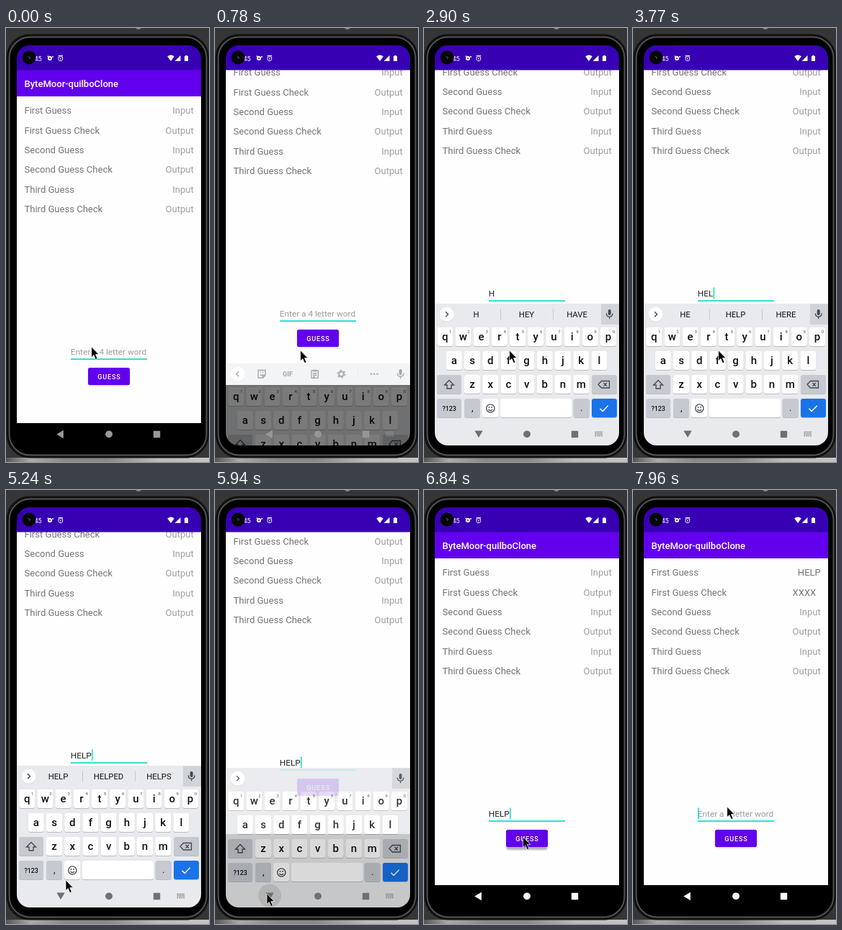
An HTML page that plays this animation: 282 px wide and 603 px high, repeating every 8000 ms.

```html
<!DOCTYPE html>
<html lang="en">
<head>
<meta charset="utf-8">
<style>
html, body { margin: 0; width: 100%; height: 100%; overflow: hidden; background: #363638; }
svg { display: block; width: 100vw; height: 100vh; }
text { font-family: Roboto, sans-serif; white-space: pre; }
.row { font-size: 13.04px; }
.field { font-size: 11.8px; }
</style>
</head>
<body>
<svg id="stage" viewBox="0 0 282 603">
  <defs>
    <clipPath id="screen"><rect x="15" y="24" width="256" height="556" rx="18"/></clipPath>
    <clipPath id="window"><rect x="15" y="58" width="256" height="522"/></clipPath>
    <linearGradient id="desk">
      <stop offset="0" stop-color="#555"/><stop offset=".12" stop-color="#aaa"/>
      <stop offset=".3" stop-color="#888"/><stop offset=".5" stop-color="#888"/>
      <stop offset=".75" stop-color="#bbb"/><stop offset="1" stop-color="#c4c4c4"/>
    </linearGradient>
    <filter id="blur" x="-20%" y="-40%" width="140%" height="180%"><feGaussianBlur stdDeviation="1.3"/></filter>
  </defs>

  <rect width="282" height="603" fill="#363638"/>
  <circle cx="184" cy="-3" r="5" fill="#888"/>
  <rect y="597" width="282" height="6" fill="url(#desk)"/>
  <rect x="2" y="10" width="278.5" height="586" rx="31" fill="#050505" stroke="#111" stroke-width="3"/>
  <rect x="4.5" y="12.5" width="274" height="581" rx="29" fill="none" stroke="#555557" stroke-width="1.8"/>
  <rect x="7.5" y="15.5" width="268" height="575" rx="26" fill="#000"/>

  <g clip-path="url(#screen)">
    <rect x="15" y="24" width="256" height="556"/>
    <g clip-path="url(#window)">
      <g id="app">
        <rect x="15" y="58" width="256" height="491" fill="#fefefe"/>
        <rect x="15" y="58" width="256" height="37" fill="#6200ee"/>
        <text x="25.5" y="82" font-size="13.04" font-weight="500" fill="#fff">ByteMoor-quilboClone</text>
        <g id="rows"></g>
        <text id="typed" class="field" x="89.8" y="454"></text>
        <rect x="90" y="459.3" width="106" height="1.6" fill="#03dac5"/>
        <rect id="caret" y="441.5" width="1.4" height="15.5" fill="#03dac5"/>
        <rect id="shade" x="114.5" width="57" height="23" rx="3" filter="url(#blur)"/>
        <rect x="114" y="472" width="58" height="24" rx="2.6" fill="#6200ee"/>
        <circle id="press" cx="143" cy="484" r="11.5" fill="#fff" opacity=".14"/>
        <text x="143.4" y="487.6" font-size="9.1" font-weight="500" letter-spacing=".82" text-anchor="middle" fill="#fff">GUESS</text>
      </g>
    </g>

    <rect x="15" y="24" width="256" height="34.5" fill="#3700b3"/>
    <text x="39.5" y="45.6" font-size="9" fill="#fff">45</text>
    <circle cx="32" cy="41" r="9.4" fill="#060606"/>
    <path d="M30.5 39.5l3 1.5-1.5 2" fill="none" stroke="#777" stroke-width=".8"/>
    <g fill="#fff">
      <circle cx="61" cy="42" r="3.1"/><circle cx="65" cy="40" r="1"/>
      <path d="M57 39.5l2-1.5v2z"/>
      <circle cx="61" cy="42" r="1" fill="#3700b3"/>
      <path d="M73 40h5.6v4l-1.2 1.5h-3.2L73 44z" fill="none" stroke="#fff" stroke-width=".9"/>
      <path d="M72.6 38h6.4v1h-6.4zM75 42h1.6v1.4H75z"/>
      <path d="M224.2 39.6q4.8-4 9.6 0L229 46z"/>
      <path d="M242.5 38v8h-8z"/>
      <path d="M248 39h1.4v-1h2.2v1h1.4v7h-5z"/>
    </g>

    <g id="board"></g>

    <circle id="ripple" cx="76" cy="563.5" r="16" opacity=".1"/>
    <g id="nav">
      <path id="back"/>
      <circle cx="143" cy="564.3" r="4.9"/>
      <rect x="204.8" y="559.8" width="9.4" height="9.4" rx=".6"/>
      <path id="switch" d="M237.5 561.5h11M237.5 564h11M237.5 566.5h2M240.5 566.5h5M246.5 566.5h2" fill="none" stroke-width="1.5" stroke-dasharray="1.4 .8"/>
    </g>
  </g>

  <path id="mouse" d="M0 0v14.5l3.2-3 2.6 6 2.5-1.1-2.6-5.8h4.5z" fill="#000" stroke="#fff" stroke-width=".7"/>
</svg>
<script>
const LOOP = 8000;
const $ = id => document.getElementById(id);
const show = (el, on) => el.setAttribute('visibility', on ? 'visible' : 'hidden');

// Latest entry [time, ...values] that has already begun.
const at = (track, t) => track.findLast(step => step[0] <= t).slice(1);

const shift = [ // time, window pan, keyboard drop, keyboard opacity
  [0, 0, 200, 0], [540, 6, 150, .12], [660, 28, 120, .3], [780, 53, 83, .48],
  [930, 73, 28, .82], [1050, 81, 0, 1], [5940, 71, 3, .85],
  [6060, 44, 20, .5], [6180, 14, 60, .2], [6300, 0, 200, 0]
];
const pointer = [
  [0, 118.7, 443], [120, 118.7, 444], [270, 118.7, 448],
  [5000, 112, 470], [5120, 98, 508], [5240, 83, 542], [5360, 73, 556],
  [5510, 71.5, 562], [5660, 72, 561], [6180, 92, 528], [6300, 113, 494],
  [6450, 126, 487], [6570, 137.5, 482], [7720, 136, 468], [7840, 133, 449], [7960, 130.7, 440]
];
const typing = [[0, ''], [2300, 'H'], [3150, 'HE'], [3520, 'HEL'], [3890, 'HELP'], [6960, '']];
const blink = [
  [0, 0], [1200, 1], [1760, 0], [2300, 1], [2900, 0], [3150, 1], [4380, 0],
  [5000, 1], [5360, 0], [5940, 1], [6450, 0], [6720, 1], [7460, 0], [7960, 1]
];
const hints = [
  [0, '', '', ''], [2420, 'H', 'HEY', 'HAVE'], [3400, 'HE', 'HELP', 'HERE'],
  [4010, 'HELP', 'HELPED', 'HELPS'], [5940, '', '', '']
];
const navTone = [[0, '#999'], [400, '#969696'], [1050, '#707070'], [6060, '#999'], [6180, '#ccc'], [6300, '#fff']];

const names = ['First', 'Second', 'Third'].flatMap(n => [n + ' Guess', n + ' Guess Check']);
$('rows').innerHTML = names.map((name, i) => {
  const y = 119.4 + i * 27.3;
  return `<text class="row" x="25.5" y="${y}" fill="#757575">${name}</text>` +
    `<text class="row value" y="${y}"></text>`;
}).join('');
const values = [...document.querySelectorAll('.value')];

function buildBoard() {
  const key = (x, y, w, fill = '#fff') =>
    `<rect x="${x}" y="${y + 1}" width="${w}" height="26" rx="3.2" fill="#b9bcc1"/>` +
    `<rect x="${x}" y="${y}" width="${w}" height="26" rx="3.2" fill="${fill}"/>`;
  const label = (x, y, s, size, extra = '') =>
    `<text x="${x}" y="${y}" font-size="${size}" text-anchor="middle" fill="#111" ${extra}>${s}</text>`;
  const line = (d, color = '#44484d', w = 1.3) =>
    `<path d="${d}" fill="none" stroke="${color}" stroke-width="${w}"/>`;
  const gray = '#c6cad0';
  const rows = [416, 449, 482, 515];
  let s = '<rect x="15" y="383" width="256" height="420" fill="#e8eaed"/>';

  [['qwertyuiop', 29.2], ['asdfghjkl', 41.8], ['zxcvbnm', 67]].forEach(([row, x0], r) => {
    const y = rows[r];
    [...row].forEach((c, i) => {
      const x = x0 + i * 25.2;
      s += key(x - 11, y, 22) + label(x, y + 18, c, 15, 'font-weight="500"');
      if (!r) s += label(x + 7.5, y + 7.5, (i + 1) % 10, 6, 'opacity=".75"');
    });
  });

  s += key(18, rows[2], 34, gray) + line('M35 489.5l6.5 6.5h-3.5v5h-6v-5h-3.5z');
  s += key(233, rows[2], 35, gray) + line('M246.5 490.5h11v9.5h-11l-4.5-4.7zM249.5 493l4.5 4.6M254 493l-4.5 4.6');
  s += key(18, rows[3], 34, gray) + label(35.2, 532, '?123', 8.8, 'font-weight="500"');
  s += key(56, rows[3], 22, gray) + label(67.2, 532, ',', 13);
  s += key(81, rows[3], 22) + '<circle cx="92.3" cy="528.5" r="5.6" fill="none" stroke="#44484d" stroke-width="1.3"/>' +
    line('M89.3 530q3 3 6 0') + '<path d="M89.7 526h1.6v1.8h-1.6zM93.3 526h1.6v1.8h-1.6z" fill="#44484d"/>';
  s += key(106, rows[3], 99);
  s += key(207.6, rows[3], 22, gray) + label(218.6, 532, '.', 13);
  s += key(233, rows[3], 35, '#1a73e8') + line('M244.5 528.8l3.7 3.7 7.5-7.8', '#fff', 1.5);

  s += '<rect id="micCell" x="246" y="383.5" width="25" height="28.5" fill="#d0d3d7"/>' +
    '<rect x="255.7" y="391" width="4" height="8" rx="2" fill="#44484d"/>' +
    line('M253.4 396.5q0 4.7 4.3 4.7t4.3-4.7M257.7 401v3.3');
  s += '<circle cx="31.5" cy="398.6" r="10" fill="#d5d7da"/><circle cx="31.5" cy="397.8" r="10" fill="#fff"/>' +
    '<path id="chevron" fill="none" stroke="#3c4043" stroke-width="1.3"/>';

  s += '<g id="tools">' +
    line('M60 392.5h10v7l-3.5 3.5H60zM70 399.5h-3.5v3.5M62.5 398.5q2 2.5 4.5 0M62.8 395.2h1.4M66 395.2h1.4') +
    label(101, 400.9, 'GIF', 9, 'font-weight="900" style="fill:#54585d"') +
    line('M134 393h9.3v10.3H134zM136 397h5.3M136 399.5h5.3M136 402h3') +
    '<path d="M136.5 391.5h4.3v3h-4.3z" fill="#54585d"/>' +
    '<circle cx="175.5" cy="397.8" r="3.4" fill="none" stroke="#54585d" stroke-width="2.2"/>' +
    '<circle cx="175.5" cy="397.8" r="5.2" fill="none" stroke="#54585d" stroke-width="1.6" stroke-dasharray="2.72 2.72"/>' +
    line('M198.5 391v14', '#d9dbde', 1) +
    [217, 221.2, 225.4].map(x => `<circle cx="${x}" cy="397.8" r="1.3" fill="#54585d"/>`).join('') + '</g>';

  s += '<g id="bar">' + line('M106.5 390.5v14.5M179.5 390.5v14.5', '#c4c7cb', 1) +
    [72.5, 142.5, 212.5].map(x => label(x, 402, '', 11.3, 'class="hint"')).join('') + '</g>';
  $('board').innerHTML = s;
}
buildBoard();
const hintTexts = [...document.querySelectorAll('.hint')];
const setText = (el, s) => { if (el.textContent !== s) el.textContent = s; };

function draw(t) {
  const [pan, drop, alpha] = at(shift, t);
  $('app').setAttribute('transform', `translate(0 ${-pan})`);
  $('board').setAttribute('transform', `translate(0 ${drop})`);
  $('board').setAttribute('opacity', alpha);

  const [word] = at(typing, t);
  const typed = $('typed');
  setText(typed, word || 'Enter a 4 letter word');
  typed.setAttribute('fill', word ? '#212121' : '#9b9b9b');
  $('caret').setAttribute('x', 90.2 + (word ? typed.getSubStringLength(0, word.length) : 0));
  show($('caret'), at(blink, t)[0]);

  const done = t >= 6960;
  values.forEach((el, i) => {
    const filled = done && i < 2;
    const left = filled && i === 1;
    setText(el, filled ? ['HELP', 'XXXX'][i] : i % 2 ? 'Output' : 'Input');
    el.setAttribute('x', left ? 221.6 : 260.8);
    el.setAttribute('text-anchor', left ? 'start' : 'end');
    el.setAttribute('fill', filled ? '#757575' : '#9e9e9e');
  });

  const raised = t >= 6720 && t < 7580;
  $('shade').setAttribute('opacity', raised ? .3 : .22);
  $('shade').setAttribute('y', raised ? 477 : 474);
  show($('press'), t >= 6960 && t < 7320);

  const suggest = t >= 2420;
  show($('tools'), !suggest);
  show($('bar'), suggest && t < 5940);
  show($('micCell'), t >= 1050);
  $('chevron').setAttribute('d', suggest ? 'M30 394.3l3.5 3.5-3.5 3.5' : 'M33 394.3l-3.5 3.5 3.5 3.5');
  at(hints, t).forEach((s, i) => setText(hintTexts[i], s));

  const [tone] = at(navTone, t);
  $('nav').setAttribute('fill', tone);
  $('switch').setAttribute('stroke', tone);
  show($('switch'), t >= 540 && t < 6180);
  const down = t >= 930 && t < 6180;
  $('back').setAttribute('d', down ? 'M70.3 559.5h11.4L76 569z' : 'M70.2 564.5l9.6-5.7v11.4z');
  show($('ripple'), t >= 5940 && t < 6180);

  const [mx, my] = at(pointer, t);
  $('mouse').setAttribute('transform', `translate(${mx} ${my})`);
}

const start = performance.now();
function tick() {
  draw((performance.now() - start) % LOOP);
  requestAnimationFrame(tick);
}
tick();
</script>
</body>
</html>
```
